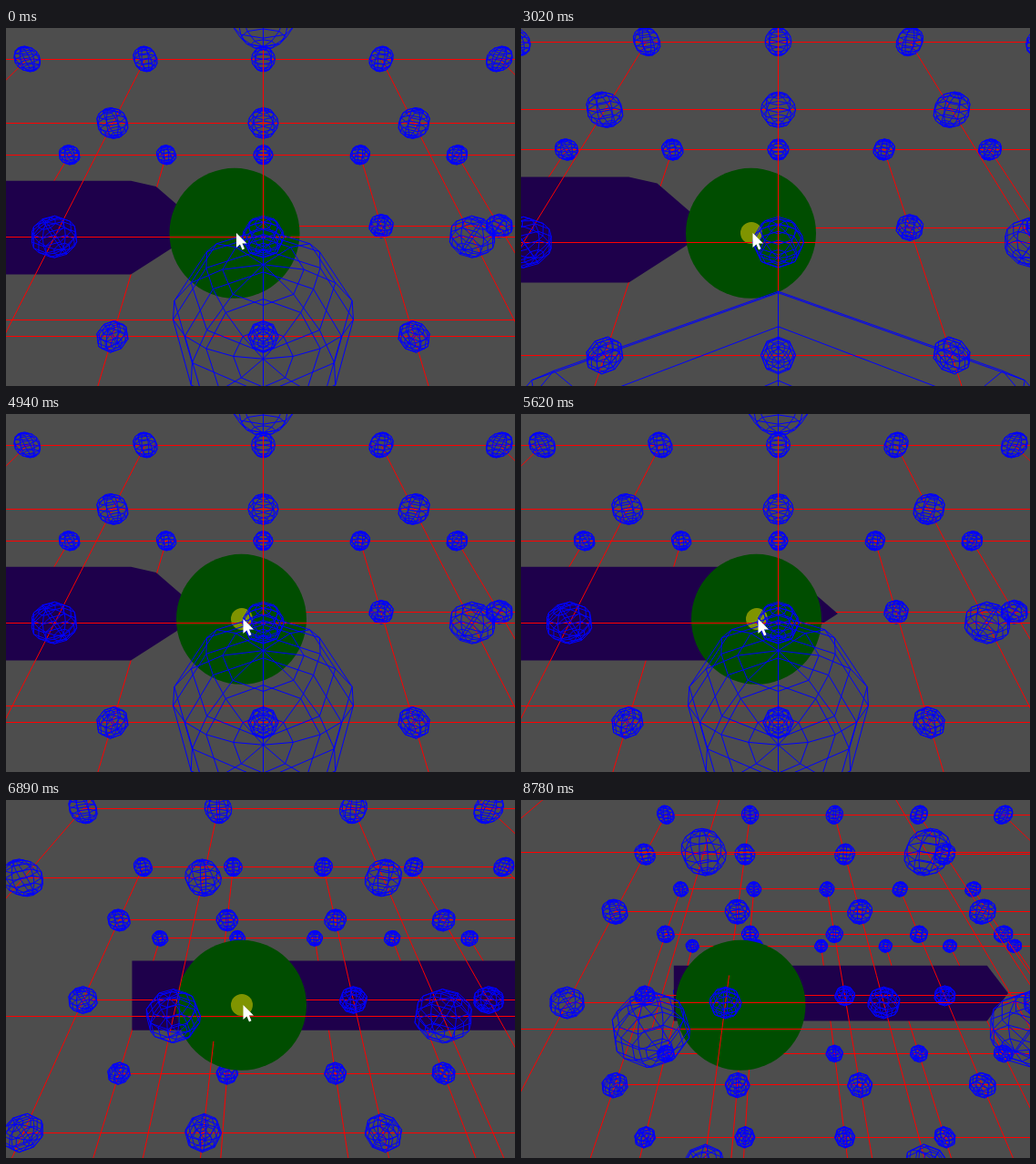
Recreate the animation shown at these times as an HTML page with a canvas. Size 559 by 393 pixels, loop 9310 ms.

```html
<!DOCTYPE html>
<html lang="en">
<head>
<meta charset="utf-8">
<title>Wireframe lattice</title>
<style>
html, body { margin: 0; width: 100%; height: 100%; overflow: hidden; background: #4d4d4d; }
canvas { display: block; }
</style>
</head>
<body>
<canvas id="stage" width="559" height="393"></canvas>
<script>
const g = document.getElementById('stage').getContext('2d');
const LOOP = 9310, FOCAL = 421.4, CX = 282.5, CY = 201.8, H = Math.SQRT1_2;
const ORIGIN_V = 0.1195, ORIGIN_D = 1.84, SLAB_D = 2.9, SLAB_HALF = 0.353;
const NEAR = 0.05, RADIUS = 0.1, DISC_DEPTH = 2.6;
const MERIDIANS = 8, RINGS = 8;
const COLS = [-3, -2, -1, 0, 1, 2, 3];

// Each burst: first step, last step, number of steps, total change
const SHIFT = [[3800, 4030, 5, 5], [4085, 4260, 4, -4], [4420, 4540, 3, -3], [4870, 4940, 2, 2],
  [5350, 5351, 1, 1], [5420, 5421, 1, -1], [6250, 6310, 2, 2], [6610, 6710, 2, 2], [6890, 6891, 1, 1]];
const ZOOM = [[3020, 3160, 2, -2], [3470, 3570, 2, 2], [6610, 6710, 2, 2], [6890, 6891, 1, 1],
  [6960, 7020, 2, 2], [7380, 7381, 1, 1]];
const DISC = [[930, 1000, 2, -3.5], [1280, 1340, 3, 5], [3800, 4260, 9, 6], [7380, 7610, 5, -17.5]];
const EDGE = [[5560, 5620, 2, 0.9], [5750, 6150, 6, 4.3], [7450, 7451, 1, -3.2]];

let shift, zoom;

function stepCount(t, [start, end, n]) {
  if (t < start) return 0;
  return Math.min(n, 1 + Math.floor((t - start) / (end - start) * (n - 1) + 1e-6));
}
const track = (t, base, bursts) =>
  bursts.reduce((sum, b) => sum + b[3] * stepCount(t, b) / b[2], base);

// Camera space: x right, v down, d away; the lattice is tilted by 45 degrees
const view = (x, a, b) => ({
  x: x + shift,
  v: ORIGIN_V + (a + b) * H,
  d: ORIGIN_D + zoom + (b - a) * H
});
const toScreen = p => [CX + p.x * FOCAL / p.d, CY + p.v * FOCAL / p.d];

function clipNear(p, q) {
  const k = (NEAR - p.d) / (q.d - p.d);
  return { x: p.x + (q.x - p.x) * k, v: p.v + (q.v - p.v) * k, d: NEAR };
}

function addEdge(p, q) {
  if (p.d < NEAR && q.d < NEAR) return;
  if (p.d < NEAR) p = clipNear(p, q);
  if (q.d < NEAR) q = clipNear(q, p);
  g.moveTo(...toScreen(p));
  g.lineTo(...toScreen(q));
}

function strokePath(color) {
  g.strokeStyle = color;
  g.lineWidth = 1;
  g.stroke();
}

function drawSphere(col, a, b) {
  const c = view(col, a, b);
  if (c.d < -RADIUS) return;
  if (c.d > 0.6) {
    const [x, y] = toScreen(c), r = 60 / c.d;
    if (x < -r || x > 559 + r || y < -r || y > 393 + r) return;
  }
  const vertex = (i, j) => {
    const lat = Math.PI * j / RINGS, lon = 2 * Math.PI * i / MERIDIANS;
    const flat = RADIUS * Math.sin(lat);
    return view(col + flat * Math.sin(lon), a - flat * Math.cos(lon), b - RADIUS * Math.cos(lat));
  };
  g.beginPath();
  for (let i = 0; i < MERIDIANS; i++) {
    for (let j = 0; j < RINGS; j++) {
      const p = vertex(i, j);
      addEdge(p, vertex(i, j + 1));
      if (j) addEdge(p, vertex(i + 1, j));
    }
  }
  strokePath('#00f');
}

// Short pieces, so that the disc can cover only the part behind it
function drawDepthLine(col, a, b, inRange) {
  const parts = 8;
  g.beginPath();
  for (let i = 0; i < parts; i++) {
    const p = view(col, a + i / parts, b), q = view(col, a + (i + 1) / parts, b);
    if (inRange((p.d + q.d) / 2)) addEdge(p, q);
  }
  strokePath('#f00');
}

function drawCrossLine(a, b) {
  const p = view(COLS[0], a, b);
  if (p.d < NEAR) return;
  const [x, y] = toScreen(p), left = Math.max(0, x);
  g.fillStyle = '#f00';
  g.fillRect(left, Math.floor(y), 559 - left, 1);
}

function drawLattice(layers, inRange) {
  for (const b of layers) {
    for (let a = -2; a <= 2; a++) {
      const here = inRange(view(0, a, b).d);
      if (here) drawCrossLine(a, b);
      for (const col of COLS) {
        if (a < 2) drawDepthLine(col, a, b, inRange);
        if (here) drawSphere(col, a, b);
      }
    }
  }
}

function drawSlab(edge) {
  const nose = edge < 0.5 ? [[0.19, -0.31], [0.55, 0]] : [[0.27, 0]];
  const outline = [[COLS[0], -SLAB_HALF], [edge, -SLAB_HALF],
    ...nose.map(([x, v]) => [edge + x, v]), [edge, SLAB_HALF], [COLS[0], SLAB_HALF]];
  g.beginPath();
  for (const [x, v] of outline) {
    g.lineTo(...toScreen({ x: x + shift, v: ORIGIN_V + v, d: SLAB_D + zoom }));
  }
  g.fillStyle = '#1e004b';
  g.fill();
}

function drawCircle(x, y, r, color) {
  g.beginPath();
  g.arc(x, y, r, 0, 2 * Math.PI);
  g.fillStyle = color;
  g.fill();
}

function drawCursor(x, y) {
  g.save();
  g.translate(x, y);
  g.fillStyle = '#fff';
  g.fill(new Path2D('M0 0V16L4 12.5L6.5 18.5L9 17.3L6.5 11.5H11.5Z'));
  g.restore();
}

function draw(t) {
  zoom = Math.round(track(t, 0, ZOOM)) / 3;
  shift = Math.round(track(t, 0, SHIFT)) / 3;
  const discX = track(t, 251, DISC);
  const behind = d => d > DISC_DEPTH, before = d => d <= DISC_DEPTH;

  g.fillStyle = '#4d4d4d';
  g.fillRect(0, 0, 559, 393);
  drawLattice([1], behind);
  drawSlab(track(t, -1, EDGE));
  drawLattice([0, -1, -2], behind);
  drawCircle(discX, 225.3, 71.5, '#004d00');
  if (t >= 3020 && t < 8090) drawCircle(discX + 0.5, 225, 12, '#7f9400');
  drawLattice([1, 0, -1, -2], before);

  if (t < 8780) {
    const k = stepCount(t, [8090, 8780, 19]) / 19;
    drawCursor(discX + 2 + 253 * k, 225 + 135 * k);
  }
}

const start = performance.now();
function frame() {
  draw((performance.now() - start) % LOOP);
  requestAnimationFrame(frame);
}
frame();
</script>
</body>
</html>
```
